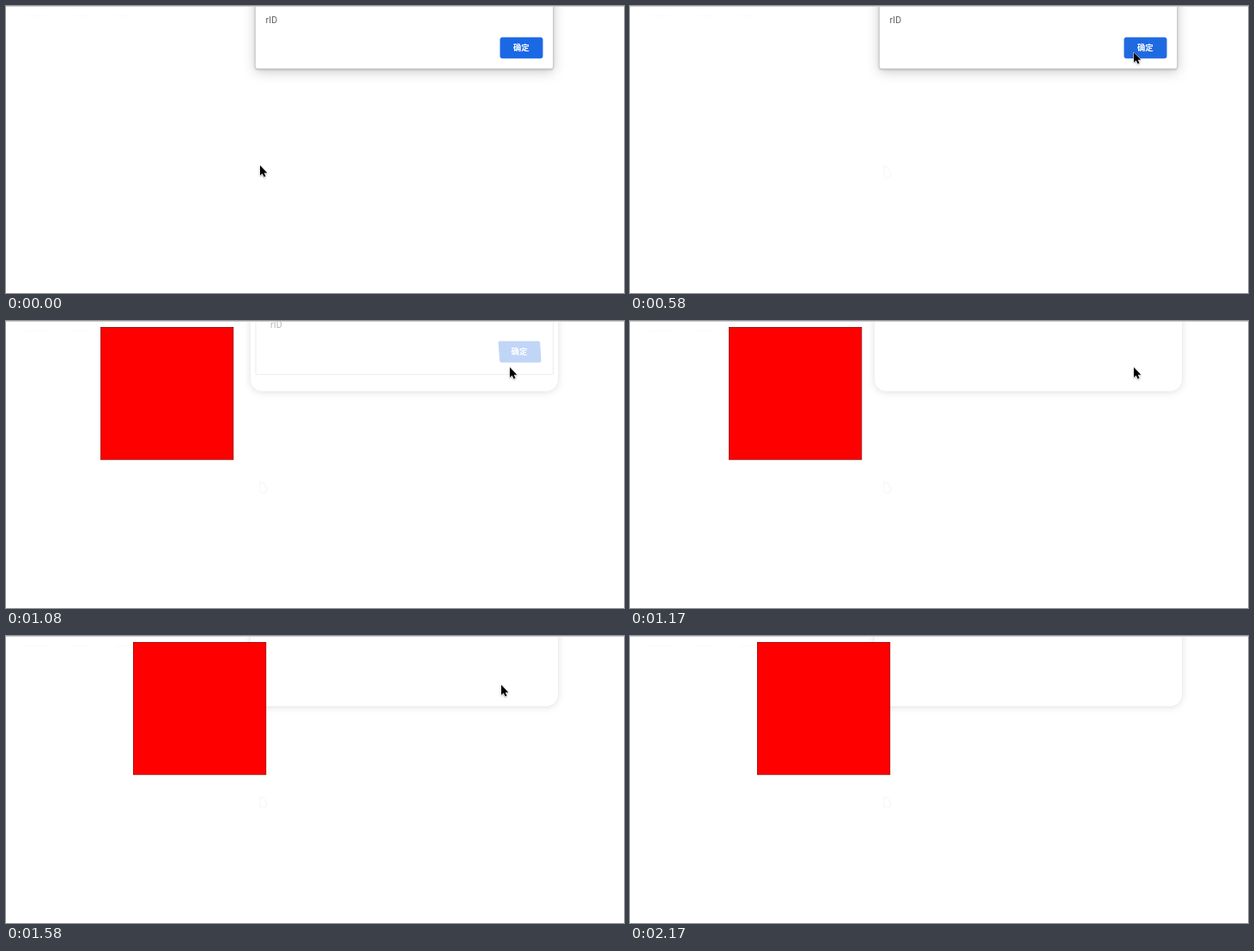
Animation of 720x335 px, one loop 3.76 s. Source, as an HTML page:

```html
<!DOCTYPE html>
<html lang="zh">
<head>
<meta charset="utf-8">
<title>Dialog and moving square</title>
<style>
  html, body { margin: 0; height: 100%; overflow: hidden; background: #fff; }
  svg { display: block; width: 100%; height: 100%; }
  text { font-family: Roboto, "Noto Sans CJK SC", "Noto Sans CJK", sans-serif; }
  .ok { font-size: 9.4px; font-weight: 700; fill: #fff; text-anchor: middle; }
  .message { font-size: 10.5px; letter-spacing: .2px; fill: #5c5c5c; }
  .panel { fill: #fff; stroke: #bbb; stroke-width: .7;
    filter: drop-shadow(0 1px 1px rgba(0,0,0,.18)) drop-shadow(0 3px 7px rgba(0,0,0,.2)); }
  .halo { fill: #fff; filter: drop-shadow(0 1px 4px rgba(0,0,0,.13)); }
  #cursor { filter: drop-shadow(0 1px 1px rgba(0,0,0,.3)); }
</style>
</head>
<body>
<svg viewBox="0 0 720 335">
  <rect width="720" height="335" fill="#fff"/>
  <path d="M24 11.5H48M78 11.5H97M128 11.5H144" stroke="#fafafa"/>
  <path id="trace" d="M296 187v12l3 2 4-1 1-5-4-6z" fill="none" stroke="#f5f5f5"/>

  <g id="dialog">
    <rect class="panel" x="290.3" y="-20" width="347.4" height="93.3" rx="2.5"/>
    <text class="message" x="302.5" y="20">rID</text>
    <rect id="button" x="575.5" y="36.5" width="50" height="24.7" rx="3"/>
    <text class="ok" x="600.3" y="52">确定</text>
  </g>

  <rect id="halo" class="halo" x="285" y="-30" width="358" height="112" rx="14"/>

  <g id="closing">
    <path d="M291 0V62.5H637.5V0" fill="none" stroke="#ededed"/>
    <text class="message" x="308" y="7.5" opacity=".45">rID</text>
    <path d="M575 23.5H620Q622 23.5 622.2 25.5L623.5 46.5Q623.5 48.5 621.5 48.5H577.5Q575.5 48.5 575.2 46.5L573.5 25.5Q573.5 23.5 575 23.5Z" fill="#c1d5f7"/>
    <text class="ok" x="598" y="39.3">确定</text>
  </g>

  <path d="M0 .5H720" stroke="#cfcfcf"/>
  <rect id="square" y="7.4" width="154.4" height="154.4" fill="#f00" stroke="#900" stroke-width=".8"/>
  <path id="cursor" d="M0 0V11.8L2.7 9.4 4.6 13.5 6.5 12.7 4.7 8.7H8.3Z"
        stroke="#fff" stroke-width="1" paint-order="stroke" stroke-linejoin="round"/>
</svg>
<script>
const LOOP = 3760, TICKS_PER_MS = 12 / 1000;
const OPEN_UNTIL = 13, SLIDE_END = 19, CURSOR_END = 26;

// Pointer stops: [tick, x, y]; each is held until the next.
const stops = [
  [0, 296, 186], [1, 330, 172], [2, 410, 138], [3, 500, 102],
  [4, 553, 81], [5, 578, 65], [6, 586, 56], [7, 587, 54],
  [19, 577, 57], [20, 568, 61], [21, 560, 65], [23, 557, 67], [25, 556.5, 90]
];

const el = id => document.getElementById(id);
const show = (id, visible) => el(id).setAttribute('visibility', visible ? 'visible' : 'hidden');
const clamp = (v, min, max) => Math.min(max, Math.max(min, v));
const mix = (a, b, p) => `rgb(${a.map((v, i) => Math.round(v + (b[i] - v) * p))})`;

function draw(ms) {
  // Small lead absorbs the 10 ms rounding of the 12 fps clock.
  const tick = Math.floor((ms + 4) * TICKS_PER_MS);
  const closed = tick >= OPEN_UNTIL;

  show('trace', tick > 0);
  show('dialog', !closed);
  show('halo', closed);
  show('closing', tick === OPEN_UNTIL);
  show('square', closed);
  show('cursor', tick < CURSOR_END);

  const hover = clamp((tick - 6) / 5, 0, 1);
  el('button').setAttribute('fill', mix([27, 104, 229], [53, 114, 211], hover));

  const n = clamp(tick, OPEN_UNTIL, SLIDE_END) - OPEN_UNTIL;
  el('square').setAttribute('x', Math.round(110 + 5 * n + 0.22 * n * n) + 0.4);

  const [, x, y] = stops.findLast(stop => stop[0] <= tick);
  el('cursor').setAttribute('transform', `translate(${x} ${y})`);
}

function frame() {
  draw(performance.now() % LOOP);
  requestAnimationFrame(frame);
}
frame();
</script>
</body>
</html>
```
